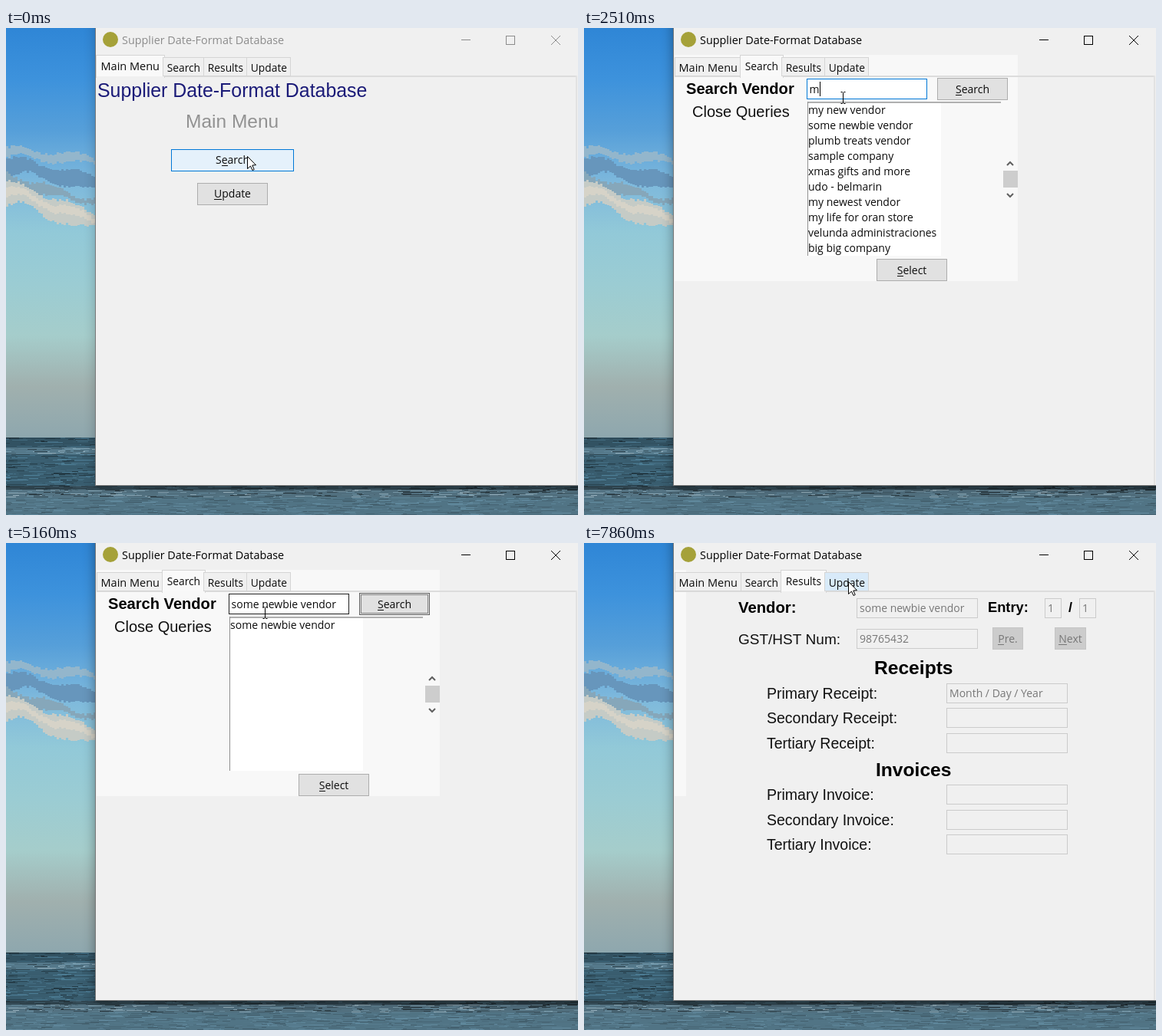
An HTML page with a canvas that plays this animation: 745 by 635 pixels, repeating every 8000 ms.

```html
<!DOCTYPE html>
<html lang="en">
<head>
<meta charset="utf-8">
<title>Supplier Date-Format Database</title>
<style>
html, body { margin: 0; width: 745px; height: 635px; overflow: hidden; }
canvas { display: block; }
</style>
</head>
<body>
<canvas id="stage" width="745" height="635"></canvas>
<script>
const W = 745, H = 635, LOOP = 8000, TICK = 130;
const LEFT = 116, BOTTOM = 597, HORIZON = 534;
const UI = '"Open Sans", "Noto Sans", sans-serif';
const ARIAL = '"Liberation Sans", Arial, sans-serif';
const BLUE = '#0078d7', FACE = '#f0f0f0', PATCH = '#f8f8f8', INK = '#0c0c0c';
const NORMAL = ['#e1e1e1', '#adadad'], FOCUS = ['#e1e1e1', '#606060'], HOVER = ['#e5f1fb', BLUE],
  PRESSED = ['#cce4f7', '#005499'], DISABLED = ['#cccccc', '#c4c4c4'];
let c = document.getElementById('stage').getContext('2d');

// Value of the last step that has begun: [[start, value], ...]
const at = (t, steps) => steps.filter(s => s[0] <= t).pop()[1];

function fill(x, y, w, h, color) {
  c.fillStyle = color;
  c.fillRect(x, y, w, h);
}
function box(x, y, w, h, bg, edge) {
  fill(x, y, w, h, edge);
  fill(x + 1, y + 1, w - 2, h - 2, bg);
}
function line(color, width, ...pts) {
  c.strokeStyle = color;
  c.lineWidth = width;
  c.beginPath();
  pts.forEach(([x, y]) => c.lineTo(x, y));
  c.stroke();
}
function text(s, x, y, color = INK, size = 14, font = UI, weight = '') {
  c.font = `${weight} ${size}px ${font}`;
  c.fillStyle = color;
  c.fillText(s, x, y);
  return c.measureText(s).width;
}
const label = (s, x, y, size = 19.5, weight = '', color = '#111') =>
  text(s, x, y, color, size, ARIAL, weight);

// Centred on cx, cy; the letter at index key is underlined
function button(s, cx, cy, w = 92, [bg, edge] = NORMAL, key = 0, ink = INK) {
  box(Math.round(cx - w / 2), Math.round(cy - 14.5), w, 29, bg, edge);
  c.font = `14px ${UI}`;
  const width = n => c.measureText(s.slice(0, n)).width;
  const x = cx - width(s.length) / 2, y = Math.round(cy) + 5;
  text(s, x, y, ink);
  fill(Math.round(x + width(key)), y + 2, Math.round(width(key + 1) - width(key)), 1, ink);
}
function field(s, x, y, w = 158) {
  box(x, y, w, 26, FACE, '#cbcbcb');
  text(s, x + 4, y + 18, '#777');
}

function makeWallpaper() {
  const canvas = document.createElement('canvas'), screen = c;
  canvas.width = W;
  canvas.height = H;
  c = canvas.getContext('2d');
  let seed = 7;
  const rnd = () => (seed = seed * 16807 % 2147483647) / 2147483647;

  const sky = c.createLinearGradient(0, 0, 0, HORIZON);
  ['#2f86d6', '#3d92dc', '#569fd9', '#7db8dc', '#92c9d8', '#9bccd3', '#a5cdcb', '#a0b0ae', '#8ea7ae']
    .forEach((color, i, all) => sky.addColorStop(i / (all.length - 1), color));
  fill(0, 0, LEFT, HORIZON, sky);

  // A sloping, ragged band that thins to the right
  function cloud(y, h, slope, color) {
    for (let x = 0; x < LEFT; x += 3) {
      const top = y + x * slope + 4 * Math.sin(x / 11 + y) + 4 * rnd();
      fill(x, Math.round(top), 3, Math.round(h * (1 - x / 230 + .25 * Math.sin(x / 17 + y))), color);
    }
  }
  cloud(154, 14, .1, '#93b6cc');
  cloud(166, 26, .22, '#6796bc');
  cloud(188, 16, .3, '#86a7ba');
  cloud(198, 34, .36, '#c5cbc6');
  cloud(204, 12, .36, '#d6d3c8');

  // Horizontal streaks of water around one lightness
  function water(x0, y0, x1, y1, light, spread, sat = 32) {
    fill(x0, y0, x1 - x0, y1 - y0, `hsl(200 ${sat}% ${light}%)`);
    for (let n = (x1 - x0) * (y1 - y0) / 24; n > 0; n--) {
      const w = 3 + 22 * rnd();
      fill(Math.round(x0 - w + (x1 - x0 + w) * rnd()), Math.floor(y0 + (y1 - y0) * rnd()), Math.round(w), 1,
        `hsl(200 ${sat}% ${light + spread * (2 * rnd() - 1)}%)`);
    }
  }
  water(0, HORIZON, LEFT, 547, 29, 12);
  water(0, 547, LEFT, 556, 44, 22, 24);
  water(0, 556, LEFT, BOTTOM, 33, 13);
  water(0, BOTTOM, W, 602, 24, 10, 25);
  water(0, 602, W, 612, 42, 25, 22);
  water(0, 612, W, H, 42, 9, 24);
  c = screen;
  return canvas;
}
const wallpaper = makeWallpaper();

function drawWindow(active) {
  const ink = active ? '#000' : '#8c8c8c';
  c.save();
  c.shadowColor = `rgba(0,0,0,${active ? .38 : .22})`;
  c.shadowBlur = 14;
  c.shadowOffsetY = 3;
  fill(LEFT, -20, W, BOTTOM + 20, '#777');
  c.restore();
  fill(LEFT + 1, 0, W, BOTTOM - 1, FACE);
  c.fillStyle = '#a5a139';
  c.beginPath();
  c.arc(136, 15, 10, 0, 7);
  c.fill();
  text('Supplier Date-Format Database', 151, 21, ink, 14.4);
  fill(593, 15, 12, 1, ink);
  box(651, 10, 12, 12, FACE, ink);
  line(ink, 1, [710, 10], [722, 22]);
  line(ink, 1, [722, 10], [710, 22]);
}

function drawTabs(page, hoverUpdate) {
  fill(118, 62, 626, 2, '#dcdcdc');
  fill(742, 62, 2, 534, '#e2e2e2');
  let x = 119;
  ['Main Menu', 'Search', 'Results', 'Update'].forEach((s, i) => {
    const size = i ? 13.8 : 14.5, on = i === page;
    c.font = `${size}px ${UI}`;
    const w = c.measureText(s).width + 9.7, left = Math.round(x), right = Math.round(x + w);
    if (on) {
      box(left - 2, 35, right - left + 4, 30, '#f9f9f9', '#d5d5d5');
      fill(left - 1, 63, right - left + 2, 2, page === 1 ? PATCH : FACE);
    } else box(left - 1, 38, right - left + 1, 25, i === 3 && hoverUpdate ? '#d8eaf9' : FACE, '#d5d5d5');
    text(s, x + 4.5, on ? 55 : 57, INK, size);
    x += w;
  });
}

function drawMenu(pressed) {
  label('Supplier Date-Format Database', 119, 90, 24.9, '', '#1b1b78');
  label('Main Menu', 234, 130, 24.5, '', '#929292');
  button('Search', 295, 172, 160, pressed ? PRESSED : HOVER, 1);
  button('Update', 295, 216);
}

const vendors = ['my new vendor', 'some newbie vendor', 'plumb treats vendor', 'sample company',
  'xmas gifts and more', 'udo - belmarin', 'my newest vendor', 'my life for oran store',
  'velunda administraciones', 'big big company'];

function drawSearch(t) {
  const chosen = t >= 5160;
  label('Search Vendor', 133, 86, 20.1, 'bold', '#000');
  label('Close Queries', 141, 116, 20);

  const query = at(t, [[0, ''], [1930, 'm'], [3940, ''], [4060, 's'], [4210, 'so'],
    [4450, 'som'], [5160, vendors[1]]]);
  box(290, 66, 157, 27, t < 5900 ? '#fff' : PATCH, at(t, [[0, BLUE], [5160, '#222'], [5900, '#7a7a7a']]));
  const width = text(query, 293.5, 85);
  const caretOn = (t + 410) % 880 >= 280;
  if (caretOn && !chosen) fill(Math.round(293.5 + width), 70, 1, 19, '#000');

  if (t >= 6020) fill(459, 49, 94, 16, '#f3f3f3');
  button('Search', 506, 79.5, 92, at(t, [[0, NORMAL], [5160, FOCUS], [6020, HOVER], [6320, PRESSED]]));
  if (chosen) {
    c.strokeStyle = '#222';
    c.lineWidth = 1;
    c.setLineDash([1, 1]);
    c.strokeRect(462.5, 67.5, 87, 24);
    c.setLineDash([]);
  }

  fill(291, 96, 252, 2, '#b0b0b0');
  fill(291, 96, 1, 201, '#8f8f8f');
  if (t >= 2080) {
    fill(292, 98, 173, 199, '#fff');
    const rows = t < 4330 ? vendors : [vendors[1]];
    rows.forEach((s, i) => text(s, 292, 112 + 20 * i));
  }
  fill(546, 186, 19, 22, '#cdcdcd');
  line('#606060', 2, [551, 179], [555, 175], [559, 179]);
  line('#606060', 2, [551, 216], [555, 220], [559, 216]);
  button('Select', 427, 315.5);
}

function drawResults() {
  label('Vendor:', 201, 91, 20.3, 'bold', '#000');
  label('GST/HST Num:', 201, 132, 19);
  label('Entry:', 526, 90, 18.3, 'bold', '#000');
  label('/', 631, 90, 18, 'bold', '#000');
  field(vendors[1], 355, 72);
  field('98765432', 355, 112);
  field('1', 600, 72, 22);
  field('1', 645, 72, 22);
  button('Pre.', 552, 124.5, 40, DISABLED, 0, '#777');
  button('Next', 633.5, 124.5, 41, DISABLED, 0, '#777');
  ['Receipt', 'Invoice'].forEach((kind, group) => {
    const top = 183 + 132.5 * group;
    label(kind + 's', 378 + 2 * group, Math.round(top - 12), 24.6, 'bold', '#000');
    ['Primary', 'Secondary', 'Tertiary'].forEach((rank, i) => {
      const y = Math.floor(top + 32.5 * i);
      label(`${rank} ${kind}:`, 238, y + 20);
      field(group + i ? '' : 'Month / Day / Year', 472, y);
    });
  });
}

// Each move: start, number of ticks, end point, and whether it ends as a text cursor
const moves = [[780, 1, 320, 151], [930, 2, 337, 83, true], [5750, 1, 363, 82, true],
  [5900, 2, 535, 78], [6180, 2, 513, 70], [7440, 4, 344, 50]];

function pointer(t) {
  let x = 314, y = 167, beam = false;
  for (const [start, ticks, toX, toY, toBeam = false] of moves) {
    if (t < start) break;
    const p = Math.min(1, (Math.floor((t - start) / TICK) + 1) / ticks);
    const eased = 1 - (1 - p) ** 3;
    x += (toX - x) * eased;
    y += (toY - y) * eased;
    beam = toBeam && p === 1;
  }
  return [Math.round(x), Math.round(y), beam];
}

const arrow = new Path2D('M0 0V16L4 12.5 6.5 18 8.7 17 6.3 11.5 11 11.2Z');
const textCursor = new Path2D('M-3 0H-1L0 1 1 0H3M0 1V14M-3 15H-1L0 14 1 15H3');

function drawPointer([x, y, beam]) {
  c.save();
  c.translate(x + .5, y + .5);
  c.fillStyle = '#fff';
  c.strokeStyle = '#000';
  c.lineWidth = 1;
  if (!beam) c.fill(arrow);
  c.stroke(beam ? textCursor : arrow);
  c.restore();
}

function frame() {
  const t = performance.now() % LOOP;
  const page = at(t, [[0, 0], [780, 1], [6450, 2]]);
  c.drawImage(wallpaper, 0, 0);
  drawWindow(t >= 650);
  if (page) fill(118, 35, page === 1 ? 447 : 15, 295, PATCH);
  drawTabs(page, t >= 7560);
  if (page === 0) drawMenu(t >= 650);
  else if (page === 1) drawSearch(t);
  else drawResults();
  drawPointer(pointer(t));
  requestAnimationFrame(frame);
}
frame();
</script>
</body>
</html>
```
